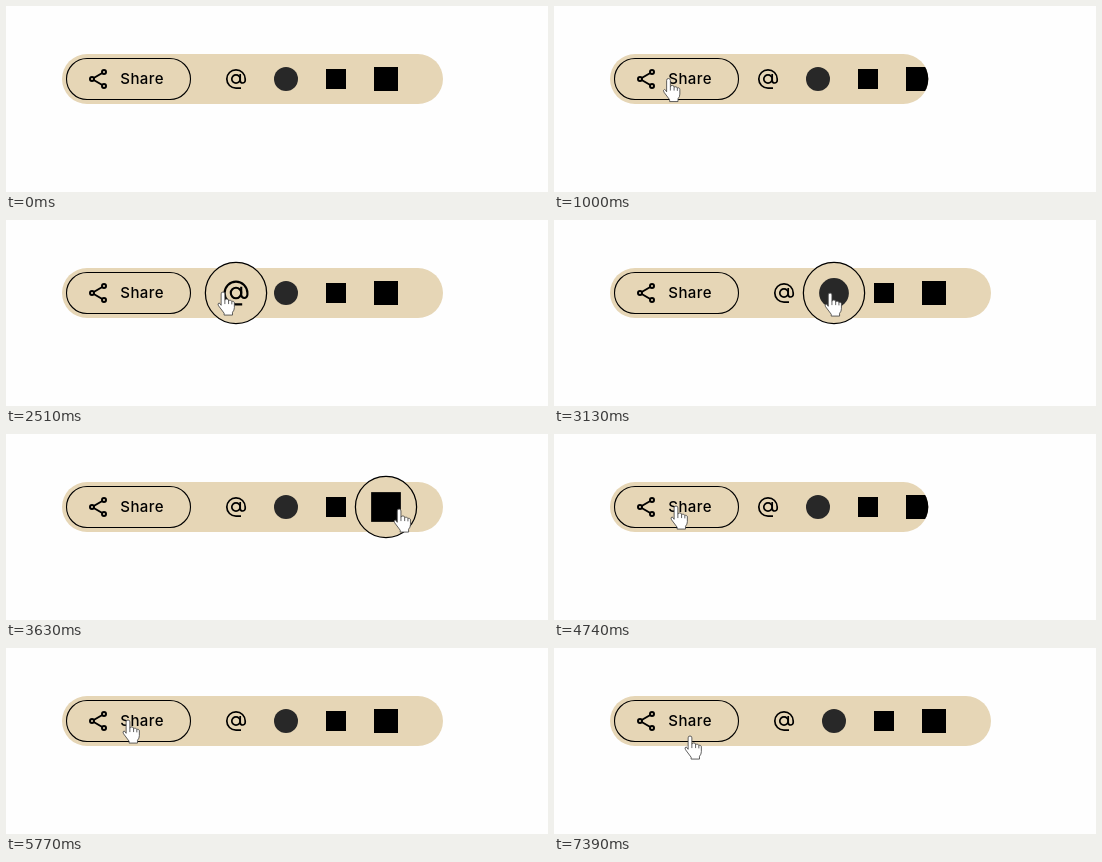
An HTML page for the animation above (8000 ms loop, 542 px wide and 186 px high).

```html
<!DOCTYPE html>
<html lang="en">
<head>
<meta charset="utf-8">
<title>Share bar</title>
<style>
  html, body { margin: 0; width: 100%; height: 100%; overflow: hidden; background: #fefefe; }
  svg { display: block; width: 542px; height: 186px; }
  text { font: 500 15px Inter, "Noto Sans", sans-serif; letter-spacing: .4px; }
  .line { fill: none; stroke: #000; stroke-width: 2; }
  .at { stroke-width: 1.7; }
  .ring { fill: #e6d6b6; stroke: #000; }
</style>
</head>
<body>
<svg viewBox="0 0 542 186">
  <clipPath id="clip"><rect class="pill" x="56" y="48" height="50" rx="25"/></clipPath>
  <rect class="pill" x="56" y="48" height="50" rx="25" fill="#e6d6b6"/>
  <rect x="60.5" y="52.5" width="124" height="41" rx="20.5" fill="none" stroke="#000" stroke-width="1.1"/>
  <g class="line" transform="translate(80 61)">
    <path d="M16.3 6 7.7 11M7.7 13l8.6 5"/>
    <circle cx="18" cy="5" r="2"/><circle cx="6" cy="12" r="2"/><circle cx="18" cy="19" r="2"/>
  </g>
  <text x="114.3" y="78">Share</text>
  <g id="icons">
    <g><circle class="ring" r="24.7"/><g class="line at"><circle r="4.2"/><path d="M5 9.2H0a9.2 9.2 0 1 1 9.2-9.2v1.5a2.5 2.5 0 0 1-5 0V-5"/></g></g>
    <g><circle class="ring" r="24.7"/><circle r="12" fill="#282828"/></g>
    <g><circle class="ring" r="24.7"/><rect x="-10" y="-10" width="20" height="20"/></g>
    <g><circle class="ring" r="24.7"/><rect x="-12" y="-12" width="24" height="24"/></g>
  </g>
  <g id="hand" fill="#fff" stroke="#444" stroke-width=".9" stroke-linejoin="round">
    <path d="M-2 14.3V2a2 2 0 0 1 4 0v7a2 1.8 0 0 1 4 .5a2 1.8 0 0 1 3.5 .8a1.7 1.7 0 0 1 2.7 1.5v5q0 3-2 5v3h-9v-2l-6-8q-1.5-2.5 .5-3q1 0 2.3 2.5z"/>
    <path d="M2 9v4M6 9.5v3.5M9.5 10.3v3"/>
  </g>
</svg>
<script>
const LOOP = 8000, LEFT = 56, CLOSED = 189, GAP = 16, SLIDE = 232, MOVE = 230, ENTER = 200;

// each press of the button closes or reopens the bar
const presses = [938, 1588, 4678, 5375];

// when the hand sets off for each icon, and finally back to the button
const departures = [2000, 2520, 3120, 3340, 3800];

// [start, x, y, duration] of the fingertip
const moves = [
  [ENTER, 124, 93],
  [510, 114.5, 72.5],
  ...departures.slice(0, 4).map((start, i) => [start, 217 + 58.7 * i, 72 + i]),
  [departures[4], 122, 72],
  [6250, 126, 77],
  [6640, 136, 88, 750]
];

const clamp = v => Math.min(1, Math.max(0, v));
const smooth = v => v * v * (3 - 2 * v);

// CSS "ease": cubic-bezier(.25, .1, .25, 1)
function ease(x) {
  x = clamp(x);
  const bezier = (u, a, b) => 3 * u * (1 - u) * ((1 - u) * a + u * b) + u ** 3;
  let low = 0, high = 1;
  for (let i = 0; i < 20; i++) {
    const mid = (low + high) / 2;
    if (bezier(mid, .25, .25) < x) low = mid; else high = mid;
  }
  return bezier(high, .1, 1);
}

const pills = document.querySelectorAll('.pill');
const icons = document.getElementById('icons');
const hand = document.getElementById('hand');

function drawBar(t) {
  const count = presses.filter(start => start <= t).length;
  const open = count % 2 === 0;
  const p = count ? ease((t - presses[count - 1]) / 400) : 1;
  const content = CLOSED + (open ? GAP : 0);
  const edge = content + SLIDE * (open ? p : 1 - p);
  pills.forEach(pill => pill.setAttribute('width', edge - LEFT));
  icons.setAttribute('clip-path', open && p === 1 ? 'none' : 'url(#clip)');

  [...icons.children].forEach((icon, i) => {
    const since = t - departures[i] - 110, left = t - departures[i + 1] - 80;
    const hover = ease(since / 200) - ease(left / 200);
    icon.setAttribute('transform', `translate(${content + 25 + 50 * i} 73) scale(${1 + .24 * hover})`);
    icon.firstChild.setAttribute('opacity', hover);
  });
}

function drawHand(t) {
  let x = 165, y = 186;
  for (const [start, toX, toY, duration = MOVE] of moves) {
    const p = smooth(clamp((t - start) / duration));
    x += (toX - x) * p;
    y += (toY - y) * p;
  }
  hand.style.display = t < ENTER ? 'none' : '';
  hand.setAttribute('transform', `translate(${x} ${y}) scale(.93)`);
}

function frame() {
  const t = performance.now() % LOOP;
  drawBar(t);
  drawHand(t);
  requestAnimationFrame(frame);
}
frame();
</script>
</body>
</html>
```
